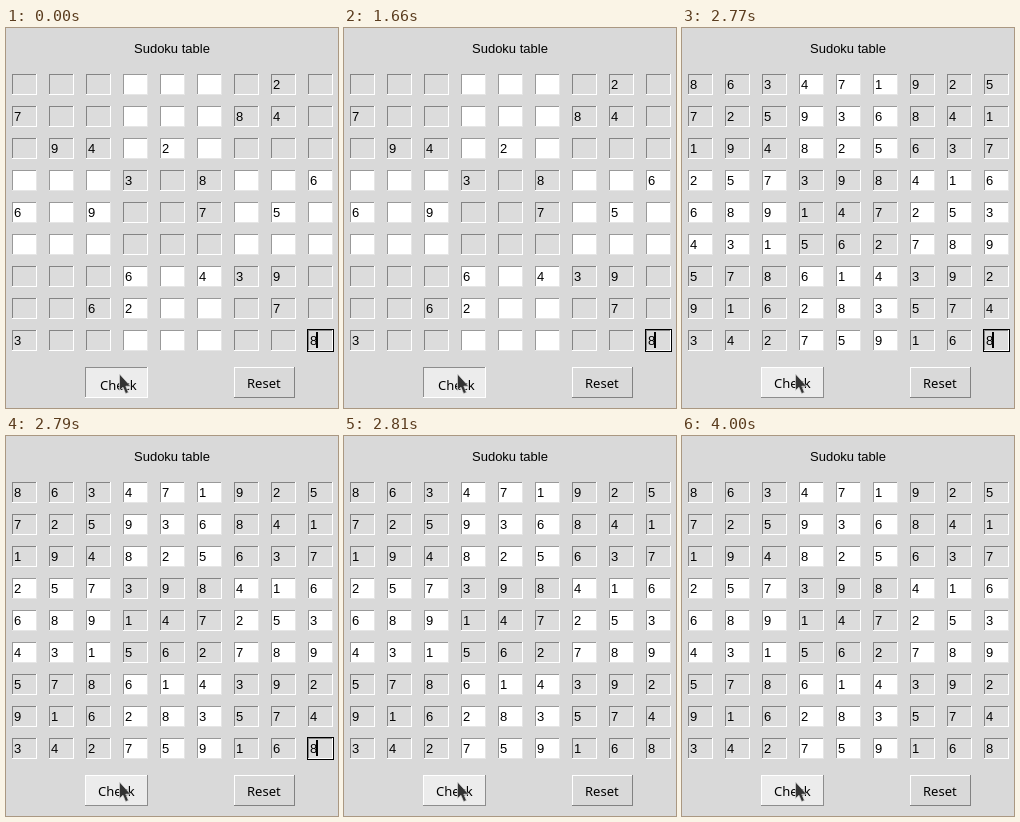
Write an HTML page that moves like this. It is 332 px wide and 380 px high and loops after 4800 ms.

```html
<!DOCTYPE html>
<html lang="en">
<head>
<meta charset="utf-8">
<title>Sudoku table</title>
<style>
  html, body { margin: 0; width: 100%; height: 100%; overflow: hidden; background: #d9d9d9; }
  svg { display: block; width: 332px; height: 380px; }
  text { font: 13px "Liberation Sans", Arial, sans-serif; fill: #000; white-space: pre; }
  .label { font-family: "Noto Sans", "Open Sans", sans-serif; }
</style>
</head>
<body>
<svg id="stage" viewBox="0 0 332 380"></svg>
<script>
const LOOP = 4800, SOLVE = 2770, BLUR = 2810;
const solution = [
  "863471925", "725936841", "194825637",
  "257398416", "689147253", "431562789",
  "578614392", "916283574", "342759168"
];
const givens = [
  ".......2.", "7.....84.", ".94.2....",
  "...3.8..6", "6.9..7.5.", ".........",
  "...6.439.", "..62...7.", "3.......8"
];
const stage = document.getElementById("stage");

function add(name, attrs, parent = stage) {
  const el = document.createElementNS("http://www.w3.org/2000/svg", name);
  for (const key in attrs) el.setAttribute(key, attrs[key]);
  parent.appendChild(el);
  return el;
}

function rect(x, y, width, height, fill, parent) {
  return add("rect", { x, y, width, height, fill, "shape-rendering": "crispEdges" }, parent);
}

function label(x, y, value, parent, cls = "") {
  const el = add("text", { x, y, class: cls }, parent);
  el.textContent = value;
  return el;
}

// One-pixel bevel: first colour on the top and left, second on the bottom and right.
function bevel(x, y, w, h, fill, first, second, parent) {
  rect(x, y, w, h, second, parent);
  rect(x, y, w - 1, 1, first, parent);
  rect(x, y, 1, h - 1, first, parent);
  rect(x + 1, y + 1, w - 2, h - 2, fill, parent);
}

function button(x, w, textX, value, fill, dark, pressed) {
  const g = add("g", {});
  const edges = pressed ? [dark, "#fff"] : ["#fff", dark];
  const shift = pressed ? 2 : 0;
  bevel(x, 339, w, 31, fill, ...edges, g);
  label(textX + shift, 360 + shift, value, g, "label");
  return g;
}

label(128, 25, "Sudoku table");

const focusRing = rect(301, 301, 27, 23, "#000");
const filled = add("g", {});
for (let row = 0; row < 9; row++) {
  for (let col = 0; col < 9; col++) {
    const x = 6 + col * 37, y = 46 + row * 32;
    const grey = (Math.floor(row / 3) + Math.floor(col / 3)) % 2 === 0;
    const colors = grey ? ["#dcdcdc", "#848484", "#fff"] : ["#fff", "#999", "#e6e6e6"];
    bevel(x, y, 25, 21, ...colors);
    const given = givens[row][col] !== ".";
    label(x + 2, y + 15, solution[row][col], given ? stage : filled);
  }
}
stage.appendChild(filled);
const caret = rect(310, 304, 2, 16, "#000");

const checkDown = button(79, 63, 92, "Check", "#ececec", "#8d8d8d", true);
const checkUp = button(79, 63, 92, "Check", "#ececec", "#8d8d8d", false);
button(228, 61, 241, "Reset", "#d9d9d9", "#828282", false);

add("path", {
  d: "M113.5 346V362.5L117 359.2L119.6 365.6L122.4 364.4L119.8 358.2H124.6Z",
  fill: "#333", stroke: "#d8d8d8", "stroke-width": 0.7
});

function show(el, on) {
  el.setAttribute("visibility", on ? "visible" : "hidden");
}

function draw(t) {
  const solved = t >= SOLVE, focused = t < BLUR;
  show(filled, solved);
  show(checkUp, solved);
  show(checkDown, !solved);
  show(focusRing, focused);
  show(caret, focused);
}

const start = performance.now();
function tick() {
  draw((performance.now() - start) % LOOP);
  requestAnimationFrame(tick);
}
tick();
</script>
</body>
</html>
```
